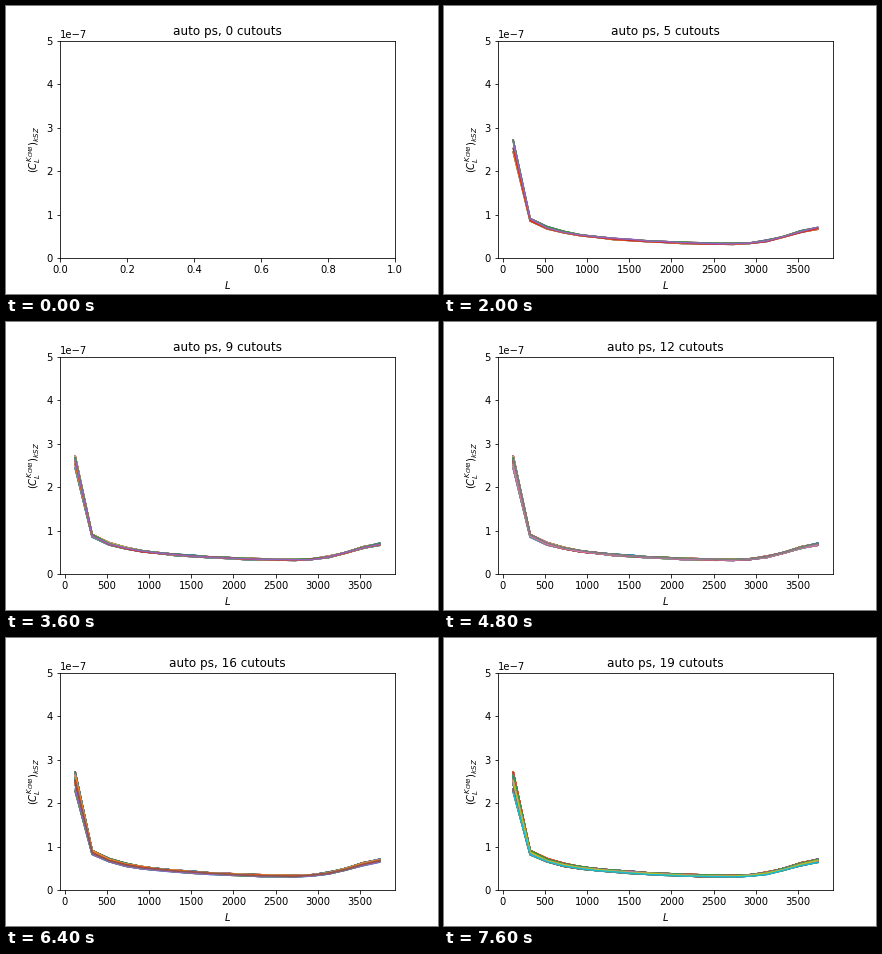
Write a matplotlib script that moves like this. It is 432 by 288 pixels and loops after 8000 ms.

```python
import numpy as np
import matplotlib.pyplot as plt
from matplotlib.animation import FuncAnimation

N_FRAMES = 20
N_CUTOUTS = N_FRAMES - 1
INTERVAL = 400

plt.rcParams.update({"font.family": "DejaVu Sans", "font.size": 10})
fig, ax = plt.subplots(figsize=(6, 4), dpi=72)
fig.subplots_adjust(left=0.125, right=0.9, bottom=0.125, top=0.88)

# Mean band powers: power law, excess in the first bin, smooth rise at high L
L = np.linspace(126, 3731, 19)
mean_ps = (0.875 * (L / L[1]) ** -0.49
           + 1.2 * np.exp(-(L - L[0]) / 40)
           + 0.5 / (1 + np.exp((3400 - L) / 200)))

# Cutouts alternate around the mean; the late ones lie lower
rng = np.random.default_rng(4)
cutout = np.arange(N_CUTOUTS)
offset = 0.052 * np.cos(2.95 * cutout) - 0.09 * (cutout > 11)
response = 0.5 + 0.5 * np.exp(-(L - L[0]) / 100)
scatter = rng.normal(0, 0.011, (N_CUTOUTS, len(L)))
spectra = 1e-7 * mean_ps * (1 + np.outer(offset, response) + scatter)

# Every step replots all cutouts so far, and the colour cycle keeps running
batches = [[ax.plot(L, ps, lw=1.5)[0] for ps in spectra[:count]]
           for count in range(N_FRAMES)]

margin = 0.05 * (L[-1] - L[0])
data_limits = (L[0] - margin, L[-1] + margin)
ax.set_ylim(0, 5e-7)
ax.set_xlabel("$L$")
ax.set_ylabel("$(C_L^{K_{CMB}})_{kSZ}$")
title = ax.set_title("")


def update(frame):
    for count, batch in enumerate(batches):
        for line in batch:
            line.set_visible(count <= frame)
    ax.set_xlim(*(data_limits if frame else (0, 1)))
    title.set_text(f"auto ps, {frame} cutouts")
    return []


anim = FuncAnimation(fig, update, frames=N_FRAMES, interval=INTERVAL,
                     init_func=lambda: update(0), repeat=True, repeat_delay=0)
plt.show()
```
